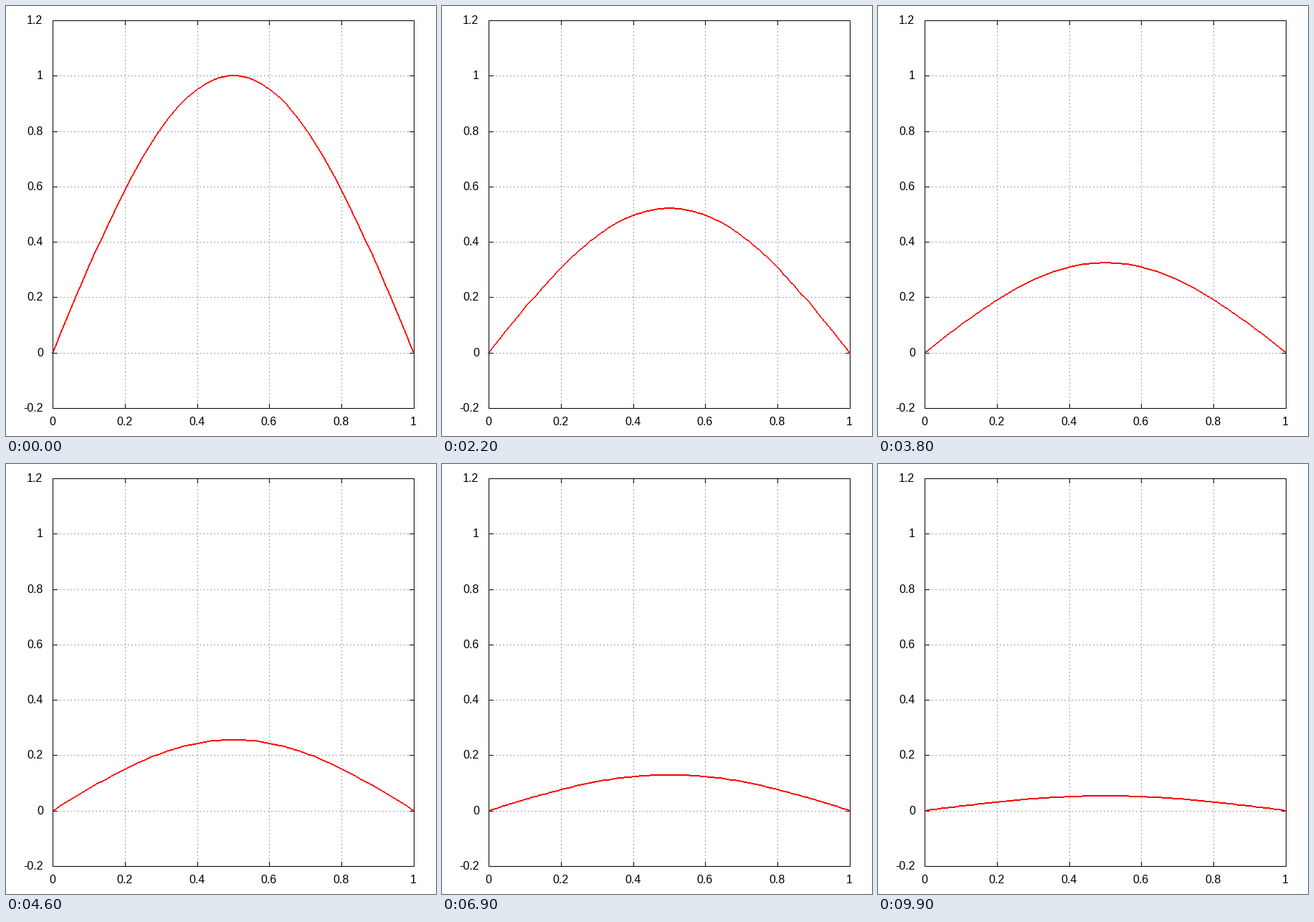
These frames come from a looping animation (600x600 px, 10000 ms). A matplotlib script:

```python
import numpy as np
import matplotlib.pyplot as plt
from matplotlib.animation import FuncAnimation
from matplotlib.collections import PolyCollection

SIZE = 600
FRAMES = 100
LEFT, RIGHT, TOP, BOTTOM = 65, 569, 20, 561
TICK = 6
DECAY = 0.003 * np.pi ** 2   # heat equation, first mode, per step
GREY = "#a0a0a0"

plt.rcParams["font.family"] = "Liberation Sans"

fig = plt.figure(figsize=(6, 6), dpi=100, facecolor="white")
ax = fig.add_axes([0, 0, 1, 1])
ax.set_xlim(0, SIZE)
ax.set_ylim(SIZE, 0)
ax.axis("off")


def px(x):
    return int(np.floor(LEFT + x * (RIGHT - LEFT) + 0.5))


def py(y):
    up = SIZE - 1 - BOTTOM
    return SIZE - 1 - int(np.floor(up + (y + 0.2) / 1.4 * (BOTTOM - TOP) + 0.5))


def box(x, y, w, h):
    return [(x, y), (x + w, y), (x + w, y + h), (x, y + h)]


def add_boxes(boxes, color, z):
    shapes = PolyCollection(boxes, facecolors=color, edgecolors="none",
                            linewidths=0, antialiaseds=False, zorder=z)
    ax.add_collection(shapes, autolim=False)
    return shapes


def stroke(x0, y0, x1, y1):
    """Crisp two-pixel line between whole-pixel points."""
    dx, dy = abs(x1 - x0), abs(y1 - y0)
    if dy <= dx:
        step = np.sign(y1 - y0)
        return [box(x0 + k, y0 + step * ((2 * k * dy + dx) // (2 * dx)) - 1, 1, 2)
                for k in range(dx + 1)]
    if y0 > y1:
        x0, y0, x1, y1 = x1, y1, x0, y0
    step = np.sign(x1 - x0)
    return [box(x0 + step * ((2 * k * dx + dy) // (2 * dy)) - 1, y0 + k, 2, 1)
            for k in range(dy + 1)]


def text_width(s):
    return sum({".": 4.45, "-": 5.33}.get(c, 8.9) for c in s)


def label(x, y, s):
    ax.text(np.floor(x), y, s, fontsize=11.52, color="black",
            ha="left", va="baseline")


grid, ticks = [], []
for i in range(6):
    v = i / 5
    x, s = px(v), f"{v:g}"
    if 0 < i < 5:
        grid += [box(x, y, 1, 2) for y in range(TOP, BOTTOM, 5)]
    ticks += [box(x, TOP, 1, TICK + 1), box(x, BOTTOM - TICK, 1, TICK + 1)]
    label(x - text_width(s) / 2, 585, s)

for i in range(-1, 7):
    v = i / 5
    y, s = py(v), f"{v:g}"
    if -1 < i < 6:
        grid += [box(x, y, 2, 1) for x in range(LEFT, RIGHT, 5)]
    ticks += [box(LEFT, y, TICK + 1, 1), box(RIGHT - TICK, y, TICK + 1, 1)]
    label(52 - text_width(s), y + 5, s)

width, height = RIGHT - LEFT + 1, BOTTOM - TOP + 1
border = [box(LEFT, TOP, width, 1), box(LEFT, BOTTOM, width, 1),
          box(LEFT, TOP, 1, height), box(RIGHT, TOP, 1, height)]

add_boxes(grid, GREY, 1)
add_boxes(ticks, "black", 2)
curve = add_boxes([], "red", 3)
add_boxes(border, "black", 4)

xs = np.linspace(0, 1, 101)


def update(n):
    ys = np.exp(-DECAY * n) * np.sin(np.pi * xs)
    pts = [(px(x), py(y)) for x, y in zip(xs, ys)]
    curve.set_verts([b for p, q in zip(pts, pts[1:]) for b in stroke(*p, *q)])
    return [curve]


anim = FuncAnimation(fig, update, frames=FRAMES, interval=100,
                     repeat=True, repeat_delay=0, blit=False)
plt.show()
```
